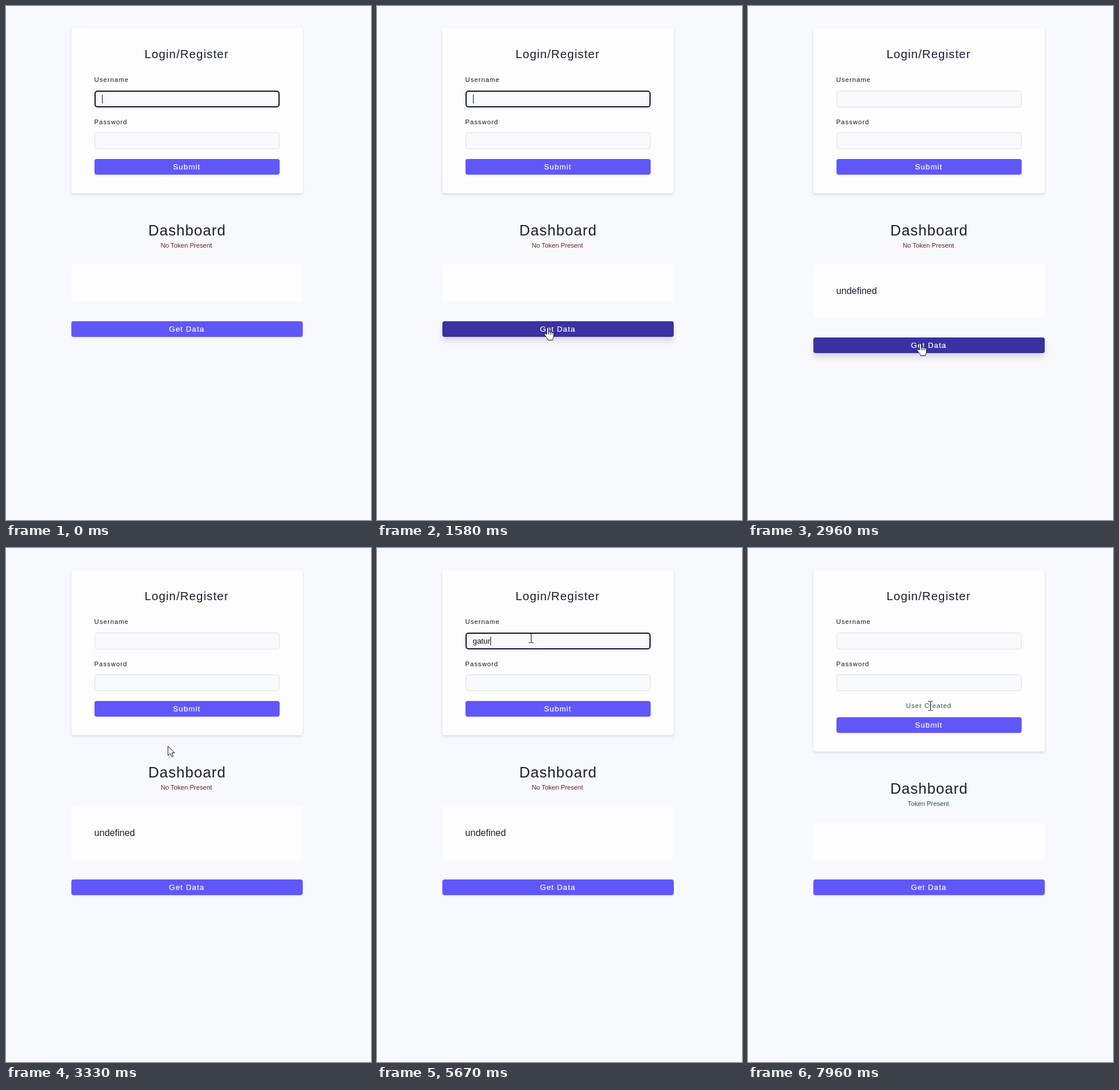
Write an HTML page that moves like this. It is 631 px wide and 887 px high and loops after 8000 ms.

```html
<!DOCTYPE html>
<html lang="en">
<head>
<meta charset="utf-8">
<title>Login and dashboard</title>
<style>
  html, body { margin: 0; width: 100%; height: 100%; overflow: hidden; background: #f8f9fc; }
  svg { display: block; width: 100vw; height: 100vh; }
  text { font-family: "Liberation Sans", Arial, sans-serif; fill: #1a1f2e; white-space: pre; }
  .label { font-size: 11.2px; letter-spacing: 1px; fill: #14161c; }
  .button { font-size: 13.33px; letter-spacing: 1px; fill: #fff; stroke: #fff; stroke-width: .2px; }
  .entry { font-size: 13.33px; fill: #111; }
  .note { font-size: 11.2px; }
  .panel { fill: #fdfdfd; }
  .field { fill: #f8f9fa; }
  .card { filter: drop-shadow(0 2px 2px rgba(60, 60, 130, .18)); }
</style>
</head>
<body>
<svg viewBox="0 0 631 887" preserveAspectRatio="none">
  <rect width="631" height="887" fill="#f8f9fc"/>

  <rect id="card" class="panel card" x="113" y="38" width="400" height="285" rx="4"/>
  <text x="239.5" y="90" font-size="20.4" letter-spacing="1">Login/Register</text>
  <text class="label" x="152.6" y="131">Username</text>
  <rect id="userBox" class="field" rx="4"/>
  <text id="user" class="entry" x="165.5" y="165"></text>
  <text class="label" x="152.6" y="204">Password</text>
  <rect id="passBox" class="field" rx="4"/>
  <text id="pass" class="entry" x="165.5" y="237"></text>
  <rect id="caret" width="1" height="15" fill="#111"/>
  <text id="created" class="label" x="273.3" y="276" style="fill:#25553a">User Created</text>
  <g id="submit">
    <rect x="153" y="264" width="320" height="27" rx="4"/>
    <text class="button" x="288.7" y="282">Submit</text>
  </g>

  <g id="board">
    <text x="246" y="396" font-size="25.6" letter-spacing="1">Dashboard</text>
    <text id="token" class="note" y="417"></text>
    <rect id="result" class="panel" x="113" y="446" width="400" rx="4"/>
  </g>
  <text id="output" x="152.6" y="497" font-size="16">undefined</text>
  <g id="fetch">
    <rect x="113" y="544" width="400" height="27" rx="4"/>
    <text class="button" x="281.8" y="562">Get Data</text>
  </g>

  <path id="beam" fill="none" stroke="#111"
    d="M-3.5 -7.5H-1L.5 -6.5L2 -7.5H4.5M-3.5 8.5H-1L.5 7.5L2 8.5H4.5M.5 -6.5V7.5"/>
  <path id="arrow" fill="#fff" stroke="#111" d="M0 0V16L3.8 12.5L6.4 18.3L9 17.2L6.5 11.5H11.5Z"/>
  <g id="hand" stroke="#111" stroke-linejoin="round">
    <path fill="#fff" d="M-1.5 1C-1.5 -1 1.5 -1 1.5 1V7C1.8 5.5 4.3 5.5 4.5 7.3C5 6 7.3 6.3 7.5 8C8 7 10.5 7.3 10.5 9.5V14C10.5 16.5 8.8 17.5 8.5 20.5H.5C.3 18 -2.5 15.5 -5 12C-6.5 10 -4 8.3 -2.5 10L-1.5 11Z"/>
    <path fill="none" d="M1.5 7V11M4.5 7.5V11M7.5 8.5V11"/>
  </g>
</svg>
<script>
const LOOP = 8000, FADE = 250, SHIFT = 28, BLINK = 530;
const NAME = "gatur";
const FETCHED = 2020, CREATED = 7620;
const FETCH_HOVER = [[1200, FETCHED], [2290, 3010]];
const SUBMIT_HOVER = [[7170, CREATED]];
const USER_FOCUS = [[-2 * BLINK, 1880], [3730, 6060]];
const PASS_FOCUS = [[6060, 7490]];
const NAME_KEYS = [4760, 4940, 5110, 5290, 5460];
const PASS_KEYS = [6400, 6540, 6690];
const BASE = [96, 87, 251], HOVER = [57, 50, 160];
// Pointer stops: time, x, y
const PATH = [
  [180, 300, 125], [600, 236, 166], [850, 236, 166], [1300, 295, 556], [2100, 295, 556],
  [2420, 298, 583], [2965, 298, 583], [3640, 266, 155], [5820, 266, 155],
  [6030, 274, 238], [6980, 274, 238], [7300, 315, 272], [LOOP, 315, 272]
];

const $ = id => document.getElementById(id);
const set = (el, attrs) => { for (const k in attrs) el.setAttribute(k, attrs[k]); };
const show = (el, on) => { el.style.display = on ? "" : "none"; };
const clamp = v => Math.min(1, Math.max(0, v));
const ease = v => v * v * (3 - 2 * v);
const mix = (a, b, k) => a + (b - a) * k;
const spanAt = (spans, t) => spans.find(([a, b]) => t >= a && t < b);
const typed = (keys, t) => keys.filter(k => t >= k).length;

function hoverLevel(spans, t) {
  return Math.max(...spans.map(([a, b]) =>
    ease(clamp((t - a) / FADE)) * (1 - ease(clamp((t - b) / FADE)))));
}

function pointerAt(t) {
  const i = PATH.findIndex(p => p[0] > t);
  if (i < 1) return null;
  const [t0, x0, y0] = PATH[i - 1], [t1, x1, y1] = PATH[i];
  const k = ease((t - t0) / (t1 - t0));
  return [mix(x0, x1, k), mix(y0, y1, k)];
}

function drawButton(group, level, dy) {
  set(group, { transform: `translate(0 ${dy})` });
  const rect = group.firstElementChild;
  rect.setAttribute("fill", `rgb(${BASE.map((c, i) => Math.round(mix(c, HOVER[i], level)))})`);
  rect.style.filter = `drop-shadow(0 ${mix(1, 7, level)}px ${mix(1, 5, level)}px rgba(50,50,110,.16))`;
}

// The border lies inside the field's 320 by 29 box
function drawField(box, y, focused) {
  const w = focused ? 2 : 1;
  set(box, {
    x: 153 + w / 2, y: y + w / 2, width: 320 - w, height: 29 - w,
    stroke: focused ? "#11112e" : "#dfe0e4", "stroke-width": w
  });
}

function drawCaret(t) {
  const inPass = !!spanAt(PASS_FOCUS, t);
  const focus = spanAt(inPass ? PASS_FOCUS : USER_FOCUS, t);
  show($("caret"), false);
  if (!focus) return;
  const keys = (inPass ? PASS_KEYS : NAME_KEYS).filter(k => k <= t);
  const since = Math.max(focus[0], ...keys);
  show($("caret"), (t - since) % (2 * BLINK) < BLINK);
  const width = keys.length ? $(inPass ? "pass" : "user").getComputedTextLength() : 0;
  set($("caret"), { x: Math.round(165.6 + width), y: inPass ? 225 : 153 });
}

function pointerKind(t, [x, y]) {
  if (spanAt(FETCH_HOVER, t) || spanAt(SUBMIT_HOVER, t)) return "hand";
  const inField = x > 153 && x < 473 && (y > 146 && y < 175 || y > 218 && y < 247);
  return inField || t >= CREATED ? "beam" : "arrow";
}

function drawPointer(t) {
  const at = pointerAt(t);
  const kind = at && pointerKind(t, at);
  for (const id of ["beam", "arrow", "hand"]) {
    show($(id), id === kind);
    if (at) set($(id), { transform: `translate(${at.map(Math.round)})` });
  }
}

function draw(t) {
  const created = t >= CREATED, fetched = t >= FETCHED && !created;
  const dy = created ? SHIFT : 0;

  set($("card"), { height: 285 + dy });
  set($("board"), { transform: `translate(0 ${dy})` });
  set($("result"), { height: fetched ? 92 : 64 });
  show($("output"), fetched);
  show($("created"), created);
  $("token").textContent = created ? "Token Present" : "No Token Present";
  set($("token"), { x: created ? 276.1 : 267.4 });
  $("token").style.fill = created ? "#25553a" : "#642126";

  drawField($("userBox"), 146, spanAt(USER_FOCUS, t));
  drawField($("passBox"), 218, spanAt(PASS_FOCUS, t));
  $("user").textContent = created ? "" : NAME.slice(0, typed(NAME_KEYS, t));
  $("pass").textContent = created ? "" : "•".repeat(typed(PASS_KEYS, t));
  drawCaret(t);

  drawButton($("submit"), hoverLevel(SUBMIT_HOVER, t), dy);
  drawButton($("fetch"), hoverLevel(FETCH_HOVER, t), t >= FETCHED ? SHIFT : 0);
  drawPointer(t);
}

const start = performance.now();
function tick() {
  draw((performance.now() - start) % LOOP);
  requestAnimationFrame(tick);
}
tick();
</script>
</body>
</html>
```
